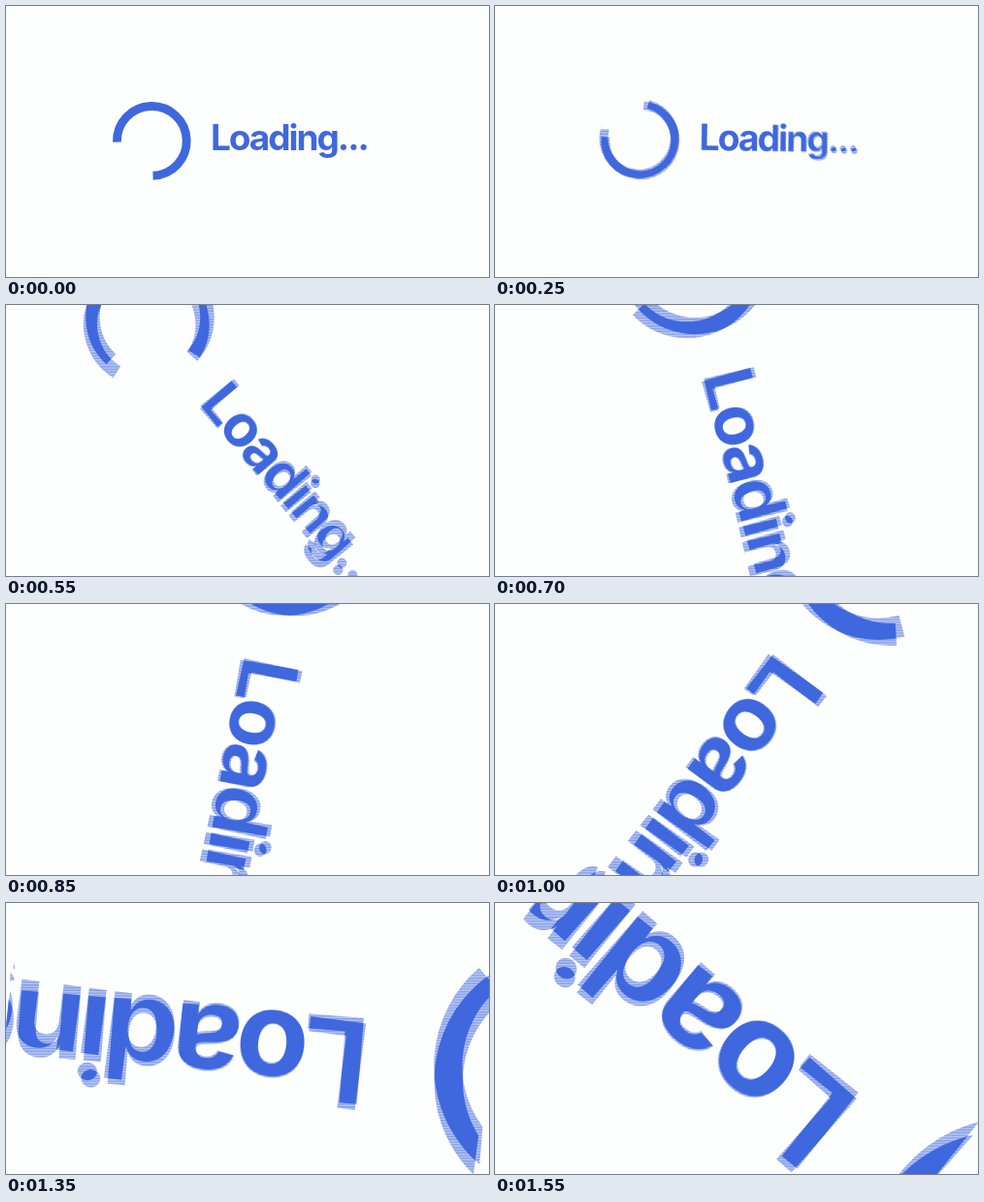
An HTML page with a canvas for the animation above (1.6 s loop, 498 by 280 pixels).

```html
<!DOCTYPE html>
<html lang="en">
<head>
<meta charset="utf-8">
<title>Loading</title>
<style>
html, body { margin: 0; width: 100%; height: 100%; overflow: hidden; background: #fdfefe; }
canvas { display: block; }
</style>
</head>
<body>
<canvas id="stage" width="498" height="280"></canvas>
<script>
const W = 498, H = 280, LOOP = 1600, STEP = 50;
const BLUE = "#4068de", PAPER = "#fdfefe";
const FIELD_OFFSET = 8;   // ms between the middle of a frame and each interlaced field
const ROW_PERIOD = 2.8;
const stage = document.getElementById("stage").getContext("2d");
const layer = document.createElement("canvas");
layer.width = W;
layer.height = H;
const ctx = layer.getContext("2d");
const rad = degrees => degrees * Math.PI / 180;

const oddRows = new Path2D();
for (let y = 0; y < H; y += ROW_PERIOD) oddRows.rect(0, y, W, ROW_PERIOD / 2);

// Time moved since start, with a short run-up centred on start.
function ramp(t, start, ease) {
  const u = t - start + ease;
  if (u <= 0) return 0;
  return u < 2 * ease ? u * u / (4 * ease) : t - start;
}

function drawSpinner(t) {
  const gap = 133 + 0.527 * ramp(t, 58, 58);
  ctx.beginPath();
  ctx.arc(-98.7, -0.6, 35.9, rad(gap + 45), rad(gap + 315));
  ctx.lineWidth = 8.8;
  ctx.strokeStyle = BLUE;
  ctx.stroke();
}

function drawLabel() {
  ctx.font = "700 37px Inter, 'Liberation Sans', sans-serif";
  ctx.letterSpacing = "-2.05px";
  ctx.fillStyle = BLUE;
  ctx.fillText("Loading...", -38, 9.3);
}

function drawField(t) {
  const moved = ramp(t, 256, 30);
  const zoom = 1 + 0.00213 * moved;
  ctx.save();
  ctx.fillStyle = PAPER;
  ctx.fillRect(0, 0, W, H);
  ctx.translate(W / 2, H / 2);
  ctx.rotate(rad(0.17 * moved));
  // The turning layer keeps the stage's width while its content grows.
  ctx.beginPath();
  ctx.rect(-W / 2, -W, W, 2 * W);
  ctx.clip();
  ctx.scale(zoom, zoom);
  drawSpinner(t);
  drawLabel();
  ctx.restore();
}

function blendLayer(alpha) {
  stage.globalAlpha = alpha;
  stage.drawImage(layer, 0, 0);
}

function render(now) {
  const t = Math.floor(now % LOOP / STEP) * STEP;
  stage.save();
  drawField(t - FIELD_OFFSET);
  blendLayer(1);
  drawField(t + FIELD_OFFSET);
  blendLayer(0.38);
  stage.clip(oddRows);
  blendLayer(0.4);
  stage.restore();
}

const startTime = performance.now();
function tick() {
  render(performance.now() - startTime);
  requestAnimationFrame(tick);
}
tick();
</script>
</body>
</html>
```
